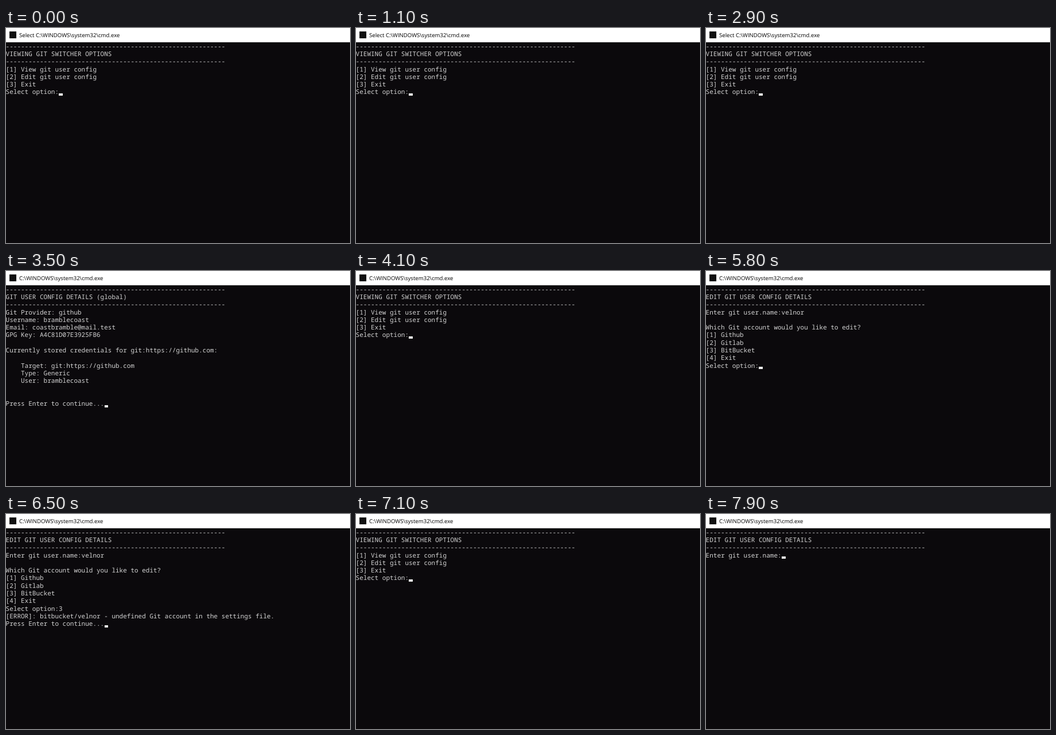
An HTML page for the animation above (8000 ms loop, 600 by 375 pixels).

```html
<!DOCTYPE html>
<html lang="en">
<head>
<meta charset="utf-8">
<title>Git switcher</title>
<style>
  html, body { margin: 0; width: 100%; height: 100%; overflow: hidden; background: #0b090c; }
  body { position: relative; text-rendering: geometricPrecision; }
  #bar {
    position: absolute; left: 0; top: 0; width: 100%; height: 24px; background: #fff; color: #000;
    border-bottom: 1px solid #e4e4e4;
    font: 9.6px/25px "Open Sans", "Noto Sans", sans-serif; white-space: pre;
  }
  #icon { position: absolute; left: 6px; top: 6px; width: 12px; height: 12px; background: #111; }
  #title { position: absolute; left: 23px; top: 0; }
  #screen {
    position: absolute; left: -0.4px; top: 25.7px; margin: 0; color: #d4d4d4;
    font: 11px/13.3px "Noto Sans Mono", "DejaVu Sans Mono", monospace;
  }
  #caret { position: absolute; width: 6.6px; height: 4px; background: #f2f2f2; }
</style>
</head>
<body>
<div id="bar"><div id="icon"></div><span id="title"></span></div>
<pre id="screen"></pre>
<div id="caret"></div>
<script>
const LOOP = 8000, CHAR = 6.6, LINE = 13.3, TOP = 25;
const [title, screen, caret] = ["title", "screen", "caret"].map(id => document.getElementById(id));

const rule = "-".repeat(58);
const page = (heading, body) => [rule, heading, rule, body].join("\n");

const menu = page("VIEWING GIT SWITCHER OPTIONS",
`[1] View git user config
[2] Edit git user config
[3] Exit
Select option:`);

const details = page("GIT USER CONFIG DETAILS (global)", "");
const account = details +
`Git Provider: github
Username: bramblecoast
Email: coastbramble@mail.test
GPG Key: A4C81D07E3925FB6
`;
const stored = account + `
Currently stored credentials for git:https://github.com:

`;
const viewed = stored +
`    Target: git:https://github.com
    Type: Generic
    User: bramblecoast


Press Enter to continue...`;

const user = "velnor";
const edit = page("EDIT GIT USER CONFIG DETAILS", "Enter git user.name:");
const typed = n => edit + user.slice(0, n);
const choose = typed(6) + `

Which Git account would you like to edit?
[1] Github
[2] Gitlab
[3] BitBucket
[4] Exit
Select option:`;
const failed = choose + `3
[ERROR]: bitbucket/${user} - undefined Git account in the settings file.
Press Enter to continue...`;

// [start in ms, screen text, caret hidden]; the caret sits after the text
const steps = [
  [0, menu], [300, menu, 1], [800, menu], [1300, menu, 1], [1800, menu], [2400, menu, 1], [2900, menu],
  [3100, menu + "1"], [3200, details], [3300, account], [3400, stored], [3500, viewed],
  [4100, menu], [4400, menu + "2"], [4500, menu + "2\n"], [4600, ""], [4700, edit],
  [4900, typed(1)], [5000, typed(2)], [5100, typed(3)], [5300, typed(5)], [5500, typed(6), 1],
  [5800, choose], [6200, choose + "3"], [6500, failed],
  [7100, menu], [7600, menu + "2"], [7700, menu + "2", 1], [7900, edit]
];

function draw(now) {
  const t = now % LOOP;
  const [, text, hidden] = steps.findLast(s => s[0] <= t);
  const lines = text.split("\n");
  title.textContent = (t < 3000 ? "Select " : "") + "C:\\WINDOWS\\system32\\cmd.exe";
  screen.textContent = text;
  caret.style.left = lines.at(-1).length * CHAR + "px";
  caret.style.top = TOP + lines.length * LINE - 4 + "px";
  caret.style.visibility = hidden ? "hidden" : "visible";
  requestAnimationFrame(draw);
}
draw(performance.now());
</script>
</body>
</html>
```
